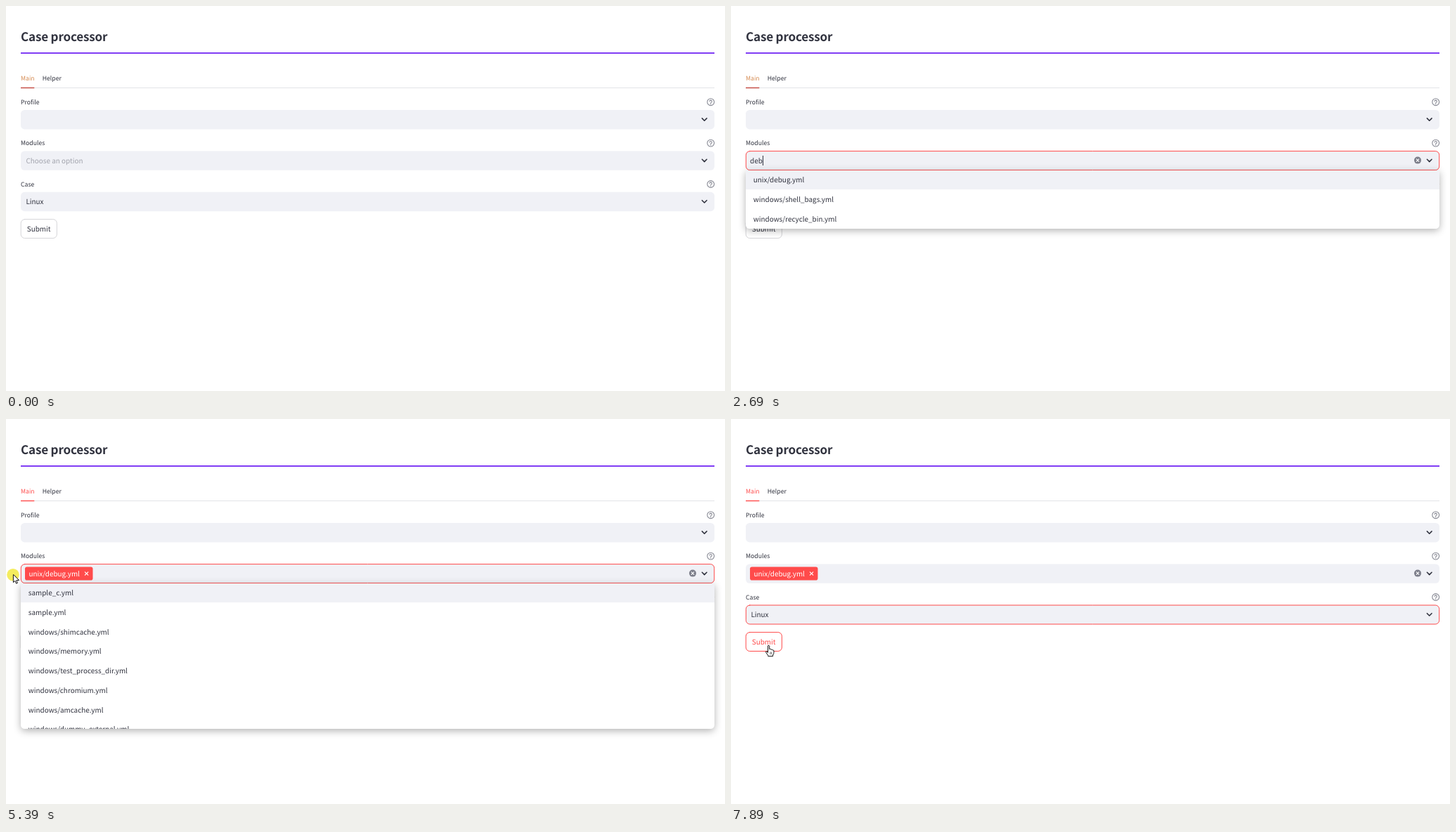
These frames come from a looping animation (1023 px wide and 548 px high, 8 s). An HTML page with a canvas:

```html
<!DOCTYPE html>
<html lang="en">
<head>
<meta charset="utf-8">
<title>Case processor</title>
<style>
  html, body { margin: 0; width: 100%; height: 100%; overflow: hidden; background: #fff; }
  canvas { display: block; }
</style>
</head>
<body>
<canvas id="stage" width="1023" height="548"></canvas>
<script>
const ctx = document.getElementById('stage').getContext('2d');
const LOOP = 8000;
const LEFT = 21, RIGHT = 1008, WIDTH = RIGHT - LEFT;
const FIELD_H = 27.4, ITEM_H = 27.72, RADIUS = 5.5;
const INK = '#31333f', RED = '#ff4b4b', FIELD = '#f0f1f6';
const BODY = 9.93, SMALL = 8.69;
const FAMILY = '"Noto Sans CJK JP", "Noto Sans CJK SC", "Noto Sans CJK KR", "Noto Sans CJK TC", "Noto Sans CJK", "Open Sans", sans-serif';

const MODULES = ['sample_c.yml', 'sample.yml', 'windows/shimcache.yml', 'windows/memory.yml',
  'windows/test_process_dir.yml', 'windows/chromium.yml', 'windows/amcache.yml', 'windows/dummy_external.yml'];
const CASES = ['Linux', 'TEST_UAC', 'TEST', 'COLLECT_TEST'];
const DEBUG = 'unix/debug.yml';
const MATCHES = {
  d: [DEBUG, 'windows/dummy_external.yml', ...MODULES.slice(2, 7), 'windows/shell_bags.yml'],
  de: [DEBUG, 'windows/dummy_external.yml', 'windows/shimcache.yml', 'windows/memory.yml',
    'windows/test_process_dir.yml', 'windows/amcache.yml', 'windows/shell_bags.yml', 'windows/recycle_bin.yml'],
  deb: [DEBUG, 'windows/shell_bags.yml', 'windows/recycle_bin.yml'],
  debu: [DEBUG],
  debug: [DEBUG]
};

// [start, value] steps; each value holds until the next start
const TYPED = [[0, ''], [2350, 'd'], [2460, 'de'], [2580, 'deb'], [2800, 'debu'], [2920, 'debug'], [4600, '']];
const CURSOR = [
  [0, null], [1000, ['beam', 53, 213.5]], [2350, null], [3810, ['hand', 90.5, 246.5]],
  [4710, ['hand', 85, 239]], [4830, ['hand', 77, 228]], [4940, ['hand', 66, 217]],
  [5170, ['arrow', 35, 219]], [5280, ['arrow', 10, 221]], [5730, ['arrow', 13, 228]],
  [5850, ['arrow', 20, 240]], [5960, ['arrow', 25, 248]], [6070, ['arrow', 29, 255]],
  [6190, ['arrow', 33, 261]], [6300, ['hand', 37, 269]], [6420, ['hand', 40, 274]],
  [6870, ['hand', 50, 292]], [6980, ['hand', 57.5, 305.5]], [7440, ['hand', 56, 311]],
  [7550, ['hand', 54, 317]], [7670, ['hand', 53.5, 320]], [7770, ['hand', 53.5, 322]]
];
const PRESSES = [[4480, 4600], [5390, 5620], [6540, 6640], [7090, 7200]];

const within = (t, from, to) => t >= from && t < to;
const held = (steps, t) => steps.filter(step => step[0] <= t).pop()[1];

function cursorAt(t) {
  if (!within(t, 110, 1000)) return held(CURSOR, t);
  const u = (Math.floor((t - 110) / 112.8)) / 7;
  const along = (a, b, c) => (1 - u) ** 2 * a + 2 * u * (1 - u) * b + u * u * c;
  return [u < 1 ? 'arrow' : 'beam', along(985, 420, 55.5), along(535, 60, 210.5)];
}

function label(text, x, y, size = BODY, color = INK, weight = 400) {
  ctx.font = `${weight} ${size}px ${FAMILY}`;
  ctx.fillStyle = color;
  ctx.fillText(text, x, y);
}

function roundBox(x, y, w, h, r, fill, stroke) {
  ctx.beginPath();
  ctx.roundRect(x, y, w, h, r);
  if (fill) { ctx.fillStyle = fill; ctx.fill(); }
  if (stroke) { ctx.strokeStyle = stroke; ctx.lineWidth = 1; ctx.stroke(); }
}

function rect(x, y, w, h, color) {
  ctx.fillStyle = color;
  ctx.fillRect(x, y, w, h);
}

function disc(x, y, r, color) {
  ctx.beginPath();
  ctx.arc(x, y, r, 0, Math.PI * 2);
  ctx.fillStyle = color;
  ctx.fill();
}

function polyline(points, color, width) {
  ctx.beginPath();
  points.forEach(([x, y]) => ctx.lineTo(x, y));
  ctx.strokeStyle = color;
  ctx.lineWidth = width;
  ctx.stroke();
}

function cross(x, y, r, width) {
  polyline([[x - r, y - r], [x + r, y + r]], '#fff', width);
  polyline([[x - r, y + r], [x + r, y - r]], '#fff', width);
}

function helpIcon(x, y) {
  ctx.beginPath();
  ctx.arc(x, y, 4.9, 0, Math.PI * 2);
  ctx.strokeStyle = '#858792';
  ctx.lineWidth = 1.1;
  ctx.stroke();
  ctx.beginPath();
  ctx.arc(x, y - 1, 1.6, Math.PI, Math.PI * 2.3);
  ctx.quadraticCurveTo(x, y + 0.6, x, y + 1.5);
  ctx.stroke();
  disc(x, y + 2.8, 0.65, '#858792');
}

function field(name, top, focused) {
  label(name, LEFT, top - 8, SMALL);
  helpIcon(1002.7, top - 11.3);
  roundBox(LEFT, top, WIDTH, FIELD_H, RADIUS, FIELD);
  if (focused) roundBox(LEFT + 0.3, top + 0.2, WIDTH - 0.6, FIELD_H - 0.4, RADIUS, null, RED);
  const y = top + 13.4;
  polyline([[990.4, y - 1.5], [993.7, y + 1.8], [997, y - 1.5]], INK, 1.6);
}

function clearIcon() {
  disc(977, 219.6, 5, '#7d7f8b');
  cross(977, 219.6, 1.7, 1.2);
}

function tag() {
  roundBox(27, 210.4, 96.5, 19.2, 2.8, RED);
  label(DEBUG, 32.5, 223.8, BODY, '#fff');
  cross(114.6, 220, 2.2, 1.2);
}

function caret(x, top) {
  rect(x, top, 1, 14, INK);
}

function menu(items, top) {
  const height = Math.min(items.length * ITEM_H, 207.2);
  const corners = [0, 0, RADIUS, RADIUS];
  ctx.save();
  ctx.shadowColor = 'rgba(0,0,0,0.3)';
  ctx.shadowBlur = 11;
  ctx.shadowOffsetY = 2.8;
  roundBox(LEFT, top, WIDTH, height, corners, '#fff');
  ctx.restore();
  ctx.save();
  ctx.beginPath();
  ctx.roundRect(LEFT, top, WIDTH, height, corners);
  ctx.clip();
  rect(LEFT, top, WIDTH, ITEM_H - 0.5, FIELD);
  items.forEach((item, i) => label(item, 31.8, top + 17.3 + i * ITEM_H));
  ctx.restore();
}

function shape(points) {
  ctx.beginPath();
  points.forEach(([x, y]) => ctx.lineTo(x, y));
  ctx.closePath();
  ctx.fillStyle = '#fff';
  ctx.fill();
  ctx.strokeStyle = '#111';
  ctx.lineWidth = 1;
  ctx.stroke();
}

const POINTERS = {
  arrow() {
    shape([[0.4, 0.5], [0.4, 11.6], [2.9, 9.3], [4.6, 13.2], [6.4, 12.4], [4.8, 8.7], [8.2, 8.5]]);
  },
  hand() {
    shape([[-1.3, 1.2], [-0.5, 0.3], [0.5, 0.3], [1.2, 1.2], [1.2, 5.4], [2.9, 5.4], [3.6, 6.2],
      [5.1, 6.1], [5.8, 7], [7, 7.1], [7.5, 8], [7.4, 11.4], [6.1, 14], [6.1, 15.7], [-0.7, 15.7],
      [-0.9, 14.3], [-3.8, 10.2], [-3.7, 8.9], [-2.7, 8.7], [-1.3, 10.2]]);
    [2.4, 4.2].forEach(x => polyline([[x, 9.8], [x, 12.8]], '#111', 0.6));
  },
  beam() {
    polyline([[-2.5, -5], [2.5, -5]], INK, 1);
    polyline([[-2.5, 5], [2.5, 5]], INK, 1);
    polyline([[0, -5], [0, 5]], INK, 1);
  }
};

function drawCursor(t) {
  const cursor = cursorAt(t);
  if (!cursor) return;
  const [kind, x, y] = cursor;
  if (PRESSES.some(([from, to]) => within(t, from, to))) disc(x, y + 0.7, 8.8, 'rgba(240,230,40,0.75)');
  ctx.save();
  ctx.translate(x, y);
  POINTERS[kind]();
  ctx.restore();
}

function header(t) {
  ctx.letterSpacing = '-0.2px';
  label('Case processor', LEFT, 50, 17.1, INK, 700);
  ctx.letterSpacing = '0px';
  rect(LEFT, 66, WIDTH, 2, '#803df5');
  const muted = t < 4710;
  label('Main', LEFT, 105.6, SMALL, muted ? '#d58a50' : RED);
  label('Helper', 51.7, 105.6, SMALL);
  rect(LEFT, 116, WIDTH, 1, '#e3e4e7');
  rect(LEFT, 115.8, 19.3, 1.4, muted ? '#c2463f' : RED);
}

function modulesField(t) {
  const typed = held(TYPED, t);
  const chosen = t >= 4600;
  field('Modules', 206.4, within(t, 1330, 5620));
  if (chosen) tag();
  else if (typed) label(typed, 27, 223.8);
  else label('Choose an option', 28.4, 223.8, BODY, '#a2a4ad');
  if (typed || chosen) clearIcon();
  if (within(t, 1330, 1790)) caret(27, 213);
  if (within(t, 2350, 3360) || within(t, 3930, 4480)) {
    ctx.font = `400 ${BODY}px ${FAMILY}`;
    caret(Math.round(27 + ctx.measureText(typed).width), 213);
  }
}

function draw(t) {
  rect(0, 0, 1023, 548, '#fff');
  header(t);
  field('Profile', 148);
  modulesField(t);
  field('Case', 264.8, t >= 6540);
  label('Linux', 28.4, 282.3);
  if (within(t, 7310, 7770)) caret(30, 271);

  const hover = t >= 7440;
  roundBox(21.2, 303.6, 51.2, 26.9, RADIUS, '#fff', hover ? RED : '#d6d6d9');
  label('Submit', 29.8, 321.2, BODY, hover ? RED : INK);

  if (within(t, 1330, 5620)) menu(MATCHES[held(TYPED, t)] || MODULES, 233.9);
  if (within(t, 1330, 1570)) rect(1005, 241, 1.4, 18, t < 1450 ? '#b4b5ba' : '#dedfe2');
  if (within(t, 6640, 7310)) menu(CASES, 292.2);
  drawCursor(t);
}

ctx.textRendering = 'geometricPrecision';
ctx.lineJoin = 'round';
ctx.lineCap = 'round';
const start = performance.now();
function tick() {
  draw((performance.now() - start) % LOOP);
  requestAnimationFrame(tick);
}
tick();
</script>
</body>
</html>
```
